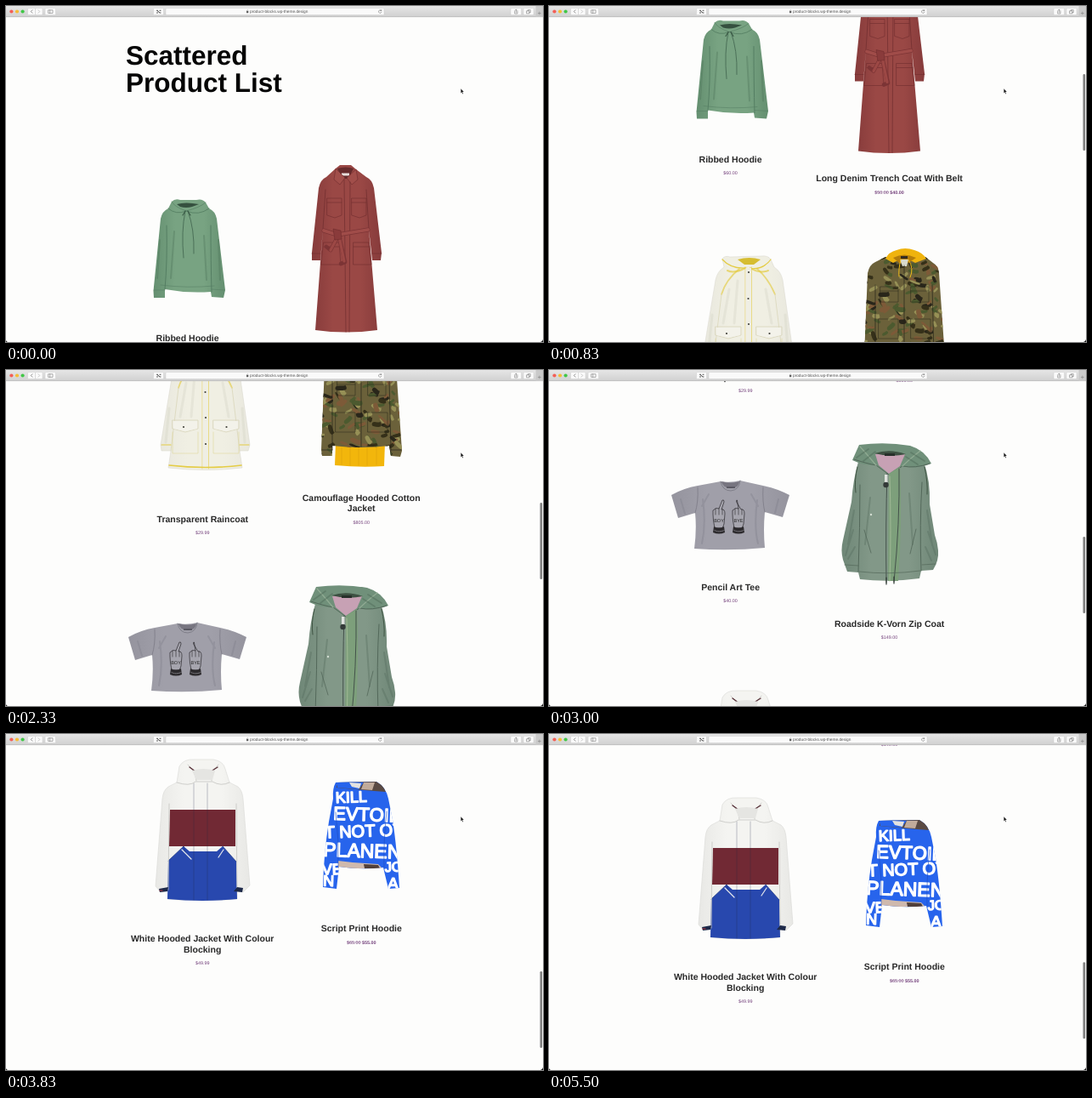
An HTML page that plays this animation: 632x395 px, repeating every 5660 ms.

```html
<!DOCTYPE html>
<html lang="en">
<head>
<meta charset="utf-8">
<title>Scattered Product List</title>
<style>
html, body { margin: 0; width: 100%; height: 100%; overflow: hidden; background: #fdfdfc; }
svg { display: block; width: 632px; height: 395px; font-family: "Liberation Sans", Arial, sans-serif; text-rendering: geometricPrecision; }
.head { font-weight: 700; font-size: 31.5px; fill: #050505; }
.name { font-weight: 700; font-size: 10.5px; fill: #292929; text-anchor: middle; }
.price { font-size: 5.4px; fill: #74417c; text-anchor: middle; }
.line { fill: none; stroke-linecap: round; stroke-linejoin: round; }
.script { fill: #fff; stroke: #fff; stroke-width: 1.5px; stroke-linejoin: round; }
</style>
</head>
<body>
<svg viewBox="0 0 632 395">
  <defs id="defs"></defs>
  <rect width="632" height="395" fill="#fdfdfc"/>
  <g id="page"></g>
  <rect id="thumb" x="628.5" width="2.6" height="90" rx="1.3" fill="#7d7d7d"/>
  <g id="chrome"></g>
</svg>
<script>
const $ = id => document.getElementById(id);
const path = (d, fill, more = '') => `<path d="${d}" fill="${fill}" ${more}/>`;
const line = (d, color, w = 0.7, more = '') => `<path class="line" d="${d}" stroke="${color}" stroke-width="${w}" ${more}/>`;
const fold = (d, color, w = 2) => line(d, color, w, 'opacity=".35"');
const rect = (x, y, w, h, fill, more = '') => `<rect x="${x}" y="${y}" width="${w}" height="${h}" fill="${fill}" ${more}/>`;
const dot = (x, y, r, fill) => `<circle cx="${x}" cy="${y}" r="${r}" fill="${fill}"/>`;
const text = (cls, x, y, s, more = '') => `<text class="${cls}" x="${x}" y="${y}" ${more}>${s}</text>`;
const at = (y, body) => `<g transform="translate(0 ${y})">${body}</g>`;
const clip = (id, d) => `<clipPath id="${id}"><path d="${d}"/></clipPath>`;

// Cloth shading: darker at both sides, lighter towards the middle
const cloth = (id, edge, mid) => `<linearGradient id="${id}">
  <stop offset="0" stop-color="${edge}"/><stop offset=".3" stop-color="${mid}"/>
  <stop offset=".7" stop-color="${mid}"/><stop offset="1" stop-color="${edge}"/></linearGradient>`;

function random(seed) {
  return () => (seed = (seed * 16807) % 2147483647) / 2147483647;
}

function label(x, y, rows, price, now) {
  const names = rows.map((r, i) => text('name', x, y + 3.7 + i * 12.5, r)).join('');
  const py = y + (rows.length - 1) * 12.5 + 18.2;
  const sum = now
    ? `<tspan>${price}</tspan> <tspan font-weight="700">${now}</tspan>`
    : price;
  const strike = now ? line(`M${x - 16.8} ${py - 1.9}h15.8`, '#74417c', 0.4) : '';
  return names + text('price', x, py, sum) + strike;
}

function hoodie() {
  const seam = '#527b60';
  return path('M195 230Q199 226 205 228L224 228Q231 226 235 231L239 238Q246 241 248 250L258 334L256 343L242 342L241 336Q214 338 187 333L187 343L174 343L173.5 335L182 250Q184 241 191 238Z', 'url(#sage)') +
    path('M201 233Q211 230 227 233L219 236Q212 238 205 236Z', '#35503f') +
    line('M191 238Q200 246 212 241Q227 247 239 238', seam, 0.8) +
    line('M195 230Q198 236 212 241Q228 237 235 231', seam, 0.6) +
    line('M189 258Q190 300 187 333M241 258Q241 300 242 336', seam, 0.9) +
    line('M182 328Q214 332 245 329M174 334L187 334M242 333L257 334', seam, 0.5) +
    fold('M181 275L178 320M250 275L252 322M198 265L194 320M233 270L236 322', '#4b7058') +
    line('M211 241Q206 265 209 296M214 241Q222 262 221 291', '#4b7058', 1) +
    line('M211 241L208 246M214 241L217 246', '#395844', 1.1);
}

function trench() {
  const seam = '#6f2d2e';
  return path('M388 191L393 187H406L412 192L424 201Q431 204 433 214L442 290L441 299L431 299L427 262L437 381Q400 386 364 381L373 262L370 299L360 299L360 290L368 214Q370 204 377 201Z', 'url(#brick)') +
    path('M390 191Q400 188 409 191L403 203H396Z', '#662b2c') +
    rect(395, 196.5, 9, 3, '#e8dedb') +
    path('M388 191L386 204L393 210L399 202Z M412 192L414 204L407 210L401 202Z', '#a14e4a', `stroke="${seam}" stroke-width=".6"`) +
    line('M376 216L373 262M424 216L427 262M398 204L400 383M405 207L404 383', seam, 0.7) +
    line('M378 226h17v20l-8 3l-9-3zM407 226h17v20l-8 3l-9-3z', seam, 0.6) +
    line('M378 231h17M407 231h17M360 291h10M431 291h11', seam, 0.6) +
    line('M374 278h18l2 26H371zM409 278h18l3 26H409zM374 283h18M409 283h19', seam, 0.6) +
    line('M374 264L390 269L426 263', '#7c3435', 5) +
    line('M374 264L390 269L426 263', '#a04c49', 3.8) +
    line('M391 270L382 287L377 283M392 271L399 301L394 303', '#7c3435', 4.6) +
    line('M391 270L382 287M392 271L398 300', '#9c4845', 3.2) +
    path('M385 262l9 2l1 10l-8 1z', '#8a3b3b', `stroke="${seam}" stroke-width=".6"`);
}

function raincoat() {
  const gold = '#e4cc45', grey = '#d6d5cb';
  return path('M204 169Q207 165 213 167L250 166Q258 165 261 170L265 179Q273 184 275 194L287 278L285 285L275 285L278 305Q235 310 191 305L194 285L183 285L182 278L196 194Q198 184 206 179Z', 'url(#mist)', `stroke="${grey}" stroke-width=".5"`) +
    path('M222 170Q236 166 249 170L241 176H230Z', '#d6bd31') +
    line('M204 170Q214 181 231 180Q251 184 261 170', gold, 1.2) +
    line('M210 183Q218 187 231 180M258 183Q248 187 237 180', gold, 2, 'opacity=".7"') +
    line('M224 181Q208 194 203 211M245 181Q258 192 266 211', gold, 1.8, 'opacity=".65"') +
    line('M203 211L194 285M266 211L275 285', '#dedbc2', 1) +
    fold('M212 205L205 245M222 195L218 245M255 205L262 245M192 235L188 275M278 235L281 275', '#d2d0c4', 3) +
    line('M231 179V306M238.5 179V306', gold, 0.9, 'opacity=".65"') +
    rect(231.5, 180, 6.5, 126, '#efeee4') +
    line('M192 302Q235 307 277 302', gold, 1.6) +
    line('M183 278H194M275 278H286', gold, 1.2) +
    line('M196 249h30v10l-15 4l-15-4zM244 249h30v10l-15 4l-15-4z', '#d9d5ba', 0.8) +
    path('M197 250h28v9l-14 3l-14-3zM245 250h28v9l-14 3l-14-3z', '#f3f2ea') +
    line('M196 263V288H226V263M244 263V288H274V263', '#dfd79b', 0.6) +
    [[235, 185], [234.5, 216], [235, 246], [235, 277], [209, 257], [259.5, 257]].map(p => dot(...p, 1.1, '#40403a')).join('');
}

const camoShape = 'M396 167L443 167L452 174Q458 177 459 186L466 285L464 292L453 291L451 279Q418 283 384 279L384 291L372 291L371 284L375 186Q377 176 384 173Z';
function camo() {
  const rnd = random(77), tones = ['#29261a', '#969056', '#4c5a2f', '#7d5a38', '#353019'];
  let spots = '';
  for (let i = 0; i < 170; i++) {
    const x = 368 + rnd() * 100, y = 166 + rnd() * 128, w = 2.5 + rnd() * 4, h = 2 + rnd() * 3;
    const turn = rnd() * 120 - 60;
    spots += path(`M${-w} 0Q${-w} ${-h} 0 ${-h * .6}T${w} ${-h * .5}Q${w * 1.5} ${h} ${w * .3} ${h * .7}T${-w} 0Z`, tones[i % 5], `transform="translate(${x} ${y}) rotate(${turn})"`);
  }
  const seam = '#27241a';
  return path('M388 276H446L445 303Q418 305 387 302Z', '#f2b60c') +
    line('M395 281V301M405 281V302M415 281V302M425 281V302M436 281V301', '#d49a09', 0.5) +
    path(camoShape, '#6b613a') + `<g clip-path="url(#camo)">${spots}</g>` +
    path('M396 169Q400 161 409 159Q419 155 430 159Q440 162 444 169L431 174Q418 166 405 174Z', '#efb30e') +
    path('M405 168Q418 161 432 168L423 174H412Z', '#b47d0b') + rect(414, 166, 8, 3, '#332c20') +
    path('M413 170h10l-2 8h-5z', '#d9dbcd') +
    line('M414 170Q411 182 412 190M423 170Q430 181 425 191', '#f2bd18', 1) +
    line('M418 177V280M384 200L384 284M451 200L453 284M372 284H384M453 284H465', seam, 0.7) +
    line('M390 202h21v18h-21zM426 202h21v18h-21zM388 240h23v23h-23zM426 240h23v23h-23zM390 207h21M426 207h21', seam, 0.5);
}

function hand(x, s, word) {
  return `<g transform="translate(${x} 0)">` +
    path(`M-7 170L-7 165Q-3 161 0 163L${s * 4} 153Q${s * 6} 152 ${s * 6} 155L3 164Q7 163 7 169L6 181Q5 184 4 186H-5Q-7 176 -7 170Z`, '#a6a5ae', 'stroke="#29272b" stroke-width=".7"') +
    line('M-4 163V170M0 163V170M4 164V170', '#29272b', 0.6) +
    `<text y="179" font-size="5.5" text-anchor="middle" fill="#222">${word}</text>` +
    path('M-6 184Q0 187 6 184L7 191Q0 194 -7 191Z', '#2c2a2d') +
    line('M-5 188.5Q0 191 6 188.5', '#a5a4a9', 0.7, 'stroke-dasharray="1 1.2"') + '</g>';
}

function tee() {
  const seam = '#777681', shade = '#7d7c88';
  return path('M202 131Q213 133 225 130L252 136Q268 139 283 147L275 173L254 167Q252 188 254 209Q213 213 171 210Q174 188 172 168L152 174L144 147Q158 139 175 136Z', 'url(#ash)') +
    path('M203 131Q214 134 224 131Q224 138 214 139Q204 138 203 131Z', '#777580') +
    line('M202 131Q204 142 214 142Q224 141 225 130', seam, 0.8) +
    rect(209, 137.5, 10, 1.2, '#44434c') +
    line('M175 138Q176 155 172 168M252 138Q251 155 254 167', seam, 0.7) +
    fold('M181 152Q185 181 180 204M245 153Q241 184 246 204M188 146L180 160M238 146L246 160M155 152L160 169M270 152L266 168', shade);
}

function zipJacket() {
  const seam = '#53685a', shade = '#52685a';
  return path('M364 108Q358 128 356 155L346 200Q343 212 346 223L351 237L364 238L366 246Q400 250 436 245L438 236L452 235Q459 224 458 212Q457 202 454 194L448 158Q449 130 441 108Z', 'url(#moss)') +
    path('M365 88Q396 84 425 89Q442 94 450 110Q431 117 416 113L401 123L385 112Q369 112 357 106Z', '#70907a') +
    path('M384 99Q401 95 419 99L413 113L400 122L388 112Z', '#c7a1b4') +
    path('M383 98Q401 92 420 99Q402 103 383 98Z', '#3d5142') + rect(395, 98, 12, 3, '#27302a') +
    line('M359 105Q374 110 385 112L400 123L416 113Q431 116 448 110', seam, 1) +
    line('M366 90Q375 100 385 112M437 95Q424 105 416 113', '#91ab93', 1.2) +
    fold('M362 103L376 93M370 107L384 96M426 97L442 107M420 102L434 111', '#435c4c', 1.8) +
    path('M400 122L413 114Q416 180 411 248L399 248Z', '#7d9f7b') +
    line('M366 135Q366 185 364 237M439 132Q436 181 438 236', seam, 1) +
    line('M363 114Q359 130 361 144M442 114Q446 132 445 146', '#3f5443', 1) +
    fold('M359 165L352 205M358 188L349 218M352 222L360 208M445 165L451 206M446 190L455 217M450 224L443 208M378 150L372 205M424 145L428 205', shade) +
    line('M398 122Q396 180 397 250M412 116Q413 180 406 249', '#43514a', 1) +
    line('M401 125Q403 190 401 248', '#a5bd99', 0.9) +
    rect(395, 123, 3.5, 9, '#dfe2de') + dot(396.5, 135, 3.2, '#333a38') +
    line('M397 244v8M406 243v8', '#303a34', 1.2) +
    line('M365 237Q400 241 437 236M348 229L364 230M439 229L455 228', seam, 0.7) +
    line('M371 188L379 215M432 187L425 216', seam, 0.8) + dot(379, 170, 1.2, '#d4ded3');
}

const parkaShape = 'M204 38Q209 29 222 30L244 30Q256 32 258 41L263 57L273 62Q278 66 279 76L287 178L279 186L272 184L272 194Q231 198 190 194L191 184L182 186L176 179L184 76Q185 66 191 62L201 57Z';
function parka() {
  return path(parkaShape, 'url(#snow)', 'stroke="#d8d8d5" stroke-width=".6"') +
    path('M193 89H270V132H192Z', '#712934') +
    path('M191 149L209 132L216 138H248L255 132L271 150L272 194Q231 198 190 194Z', '#2848ae') +
    line('M191 149L209 132L212 142M255 132L271 150', '#1b347f', 0.7) +
    line('M207 136l11 11M256 136l-6 9', '#e6e7ec', 1.2) +
    line('M221 58V195M237 58V195', '#232744', 0.5, 'opacity=".55"') +
    line('M201 57Q216 62 223 56H243Q253 62 263 57M214 36Q223 44 224 55M250 36Q241 44 242 55', '#cacac7', 0.9) +
    line('M216 39L223 44M249 39L241 44', '#573038', 1.4) +
    path('M219 43Q232 39 246 43L243 54H224Z', '#e5e5e2') +
    line('M192 82L191 183M271 82L272 183', '#c9c9c6', 0.9) +
    path('M180 182L191 180L190 185L181 186ZM272 180L279 181L278 186L268 185Z', '#1d2949') +
    line('M181 184h3', '#b8373f', 1.2);
}

const scriptShape = 'M388 57L436 56Q447 62 450 76L455 101Q460 133 463 181L450 182L444 157Q418 160 392 156L389 182L373 180Q374 139 380 103L385 76Q384 64 388 57Z';
function scriptHoodie() {
  const rows = [[388, 80, 18, 'KILL'], [385, 102, 22, 'EVTOIL'], [375, 121, 20, 'T NOT OYS'], [373, 145, 23, 'PLANENO'], [372, 164, 18, 'VE'], [373, 180, 18, 'N'], [446, 163, 16, 'JO'], [449, 181, 19, 'A']];
  const words = rows.map(([x, y, size, s], i) =>
    text('script', x, y, s, `font-size="${size}" transform="rotate(${i % 2 ? 2 : -2} 418 ${y})"`)).join('');
  return path(scriptShape, '#2764ec') + `<g clip-path="url(#script)">${words}` +
    path('M389 56Q415 53 443 57L447 68Q420 66 389 63Z', '#5a4a43') +
    path('M388 55L421 57L415 65L390 63Z', '#2764ec') + path('M404 57l14 1l-2 6l-9-2z', '#e4e2df') +
    path('M421 57L434 57L431 66L418 65Z', '#c1ab9b') +
    path('M391 149L408 151L438 153L443 158H391Z', '#cfb9ad') + path('M421 153l17 1l2 4h-18z', '#51403b') + '</g>' +
    line('M388 92Q392 124 391 156M448 91Q444 128 445 157', '#1b4bc0', 0.6);
}

function pointer() {
  return path('M535.2 97V102.6L536.4 101.5L537.3 103.5L538.2 103.1L537.3 101.1H539Z', '#111', 'stroke="#fff" stroke-width=".35"');
}

function chrome() {
  const key = (x, w) => rect(x, 2.5, w, 8, '#fafafa', 'rx="1.2" stroke="#c4c4c4" stroke-width=".4"');
  const ink = '#606060';
  return rect(0, 0, 632, 13, 'url(#bar)') + rect(0, 12.5, 632, 0.6, '#b4b4b4') +
    dot(6.4, 6.5, 2.1, '#f45f57') + dot(13, 6.5, 2.1, '#f6bd35') + dot(19.6, 6.5, 2.1, '#42c748') +
    key(25.5, 9) + key(34.5, 8.5) + key(46, 12.5) + key(173.5, 12) + key(188, 257) + key(594, 12.5) + key(609, 12) +
    line('M31 4.8L29.3 6.5L31 8.2', ink) + line('M38 4.8L39.7 6.5L38 8.2', '#b5b5b5') +
    line('M50 4.8h5v3.6h-5zM51.7 4.8v3.6', ink, 0.5) +
    line('M177.5 5.3h1M181 5.3h1M177.5 8h1M181 8h1M178.5 6l2 1.5', '#333', 0.9) +
    rect(283, 6, 2.3, 2.2, ink) + line('M283.5 6V5.2q.7-1 1.4 0V6', ink, 0.4) +
    text('url', 287, 8.3, 'product-blocks.wp-theme.design', 'font-size="4.75" fill="#555"') +
    line('M441.6 5.3A1.8 1.8 0 1 0 442 7.2M441.8 4.4V5.6H440.5', ink, 0.5) +
    line('M598.7 6v3h3.2v-3M600.3 7.4V4.2M599.3 5.1l1-1l1 1', ink, 0.5) +
    line('M613 5.8h3v3h-3zM614.2 5.8v-1.2h3v3h-1.2', ink, 0.5) +
    rect(623.5, 0, 8.5, 13, '#c9c9c9') + line('M627.8 7v3M626.3 8.5h3', '#777', 0.5) +
    path('M0 395V393Q.3 394.7 2 395ZM632 395V392Q631.5 394.5 629 395Z', '#111') + pointer();
}

$('defs').innerHTML =
  cloth('sage', '#648f70', '#78a382') + cloth('brick', '#863b3b', '#9a4845') +
  cloth('mist', '#e9e8de', '#f0efe3') + cloth('ash', '#95949e', '#a09fa9') +
  cloth('moss', '#6f8777', '#829888') + cloth('snow', '#e8e8e5', '#f4f4f1') +
  clip('camo', camoShape) + clip('script', scriptShape) +
  '<linearGradient id="bar" x2="0" y2="1"><stop stop-color="#e6e6e6"/><stop offset="1" stop-color="#d0d0d0"/></linearGradient>';

$('page').innerHTML =
  text('head', 141, 69, 'Scattered') + text('head', 141, 100.5, 'Product List') +
  hoodie() + trench() +
  at(338.5, raincoat() + camo()) +
  at(695.5, tee() + hand(200, 1, 'BOY') + hand(223, -0.4, 'BYE') + zipJacket()) +
  at(1042.5, parka() + scriptHoodie()) +
  label(213.6, 390.6, ['Ribbed Hoodie'], '$60.00') +
  label(400.6, 413, ['Long Denim Trench Coat With Belt'], '$50.00', '$40.00') +
  label(231.3, 703.5, ['Transparent Raincoat'], '$29.99') +
  label(418.2, 678.5, ['Camouflage Hooded Cotton', 'Jacket'], '$805.00') +
  label(213.6, 950.5, ['Pencil Art Tee'], '$40.00') +
  label(400.6, 993.5, ['Roadside K-Vorn Zip Coat'], '$149.00') +
  label(231.2, 1283, ['White Hooded Jacket With Colour', 'Blocking'], '$49.99') +
  label(418.3, 1271, ['Script Print Hoodie'], '$65.00', '$55.00');
$('chrome').innerHTML = chrome();

// Scroll position by step, six steps a second
const LOOP = 5660;
const keys = [[0, 0], [1, 20], [5, 210.5], [8, 338.5], [10, 470], [13, 470], [14, 528.5], [18, 695.5],
  [20, 815], [22, 990], [23, 1042.5], [27, 1042.5], [28, 1065], [30, 1130], [31, 1130], [32, 1085], [33, 997.5]];

function scrollAt(step) {
  const i = Math.max(1, keys.findIndex(k => k[0] >= step));
  const [a, from] = keys[i - 1], [b, to] = keys[i];
  return from + (to - from) * (step - a) / (b - a);
}

function draw(t) {
  let step = 0;
  while (step < 33 && Math.floor((step + 1) * 100 / 6) * 10 <= t) step++;
  const y = scrollAt(step);
  $('page').setAttribute('transform', `translate(0 ${-y})`);
  $('thumb').setAttribute('y', 29.8 + y * 0.239);
  $('thumb').setAttribute('opacity', step ? 1 : 0);
}

const start = performance.now();
function tick() {
  draw((performance.now() - start) % LOOP);
  requestAnimationFrame(tick);
}
tick();
</script>
</body>
</html>
```
